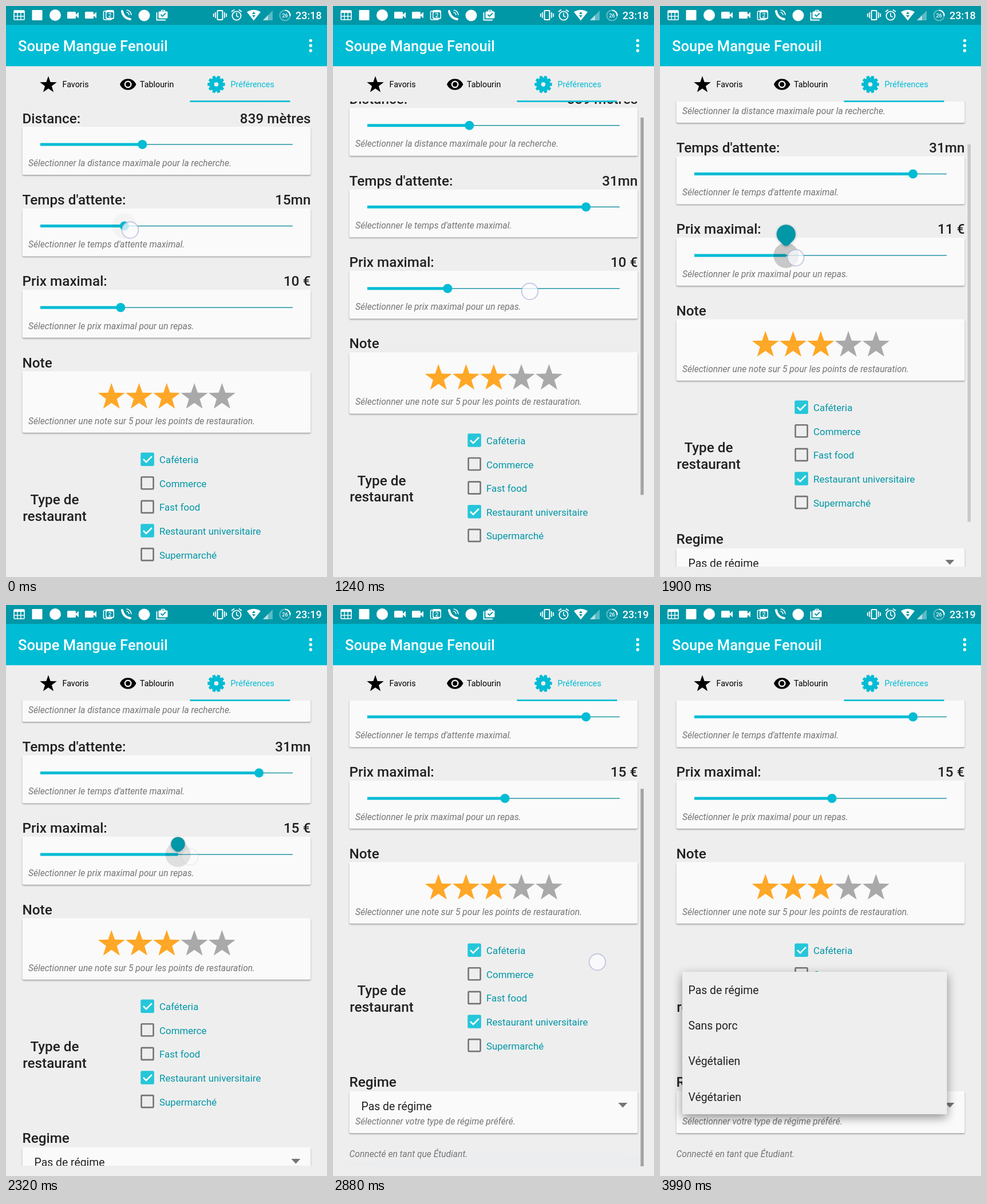
Recreate the animation shown at these times as an HTML page with a canvas. Size 561 by 998 pixels, loop 4050 ms.

```html
<!DOCTYPE html>
<html lang="fr">
<head>
<meta charset="utf-8">
<title>Préférences</title>
<style>
html, body { margin: 0; width: 100%; height: 100%; overflow: hidden; background: #eee; }
canvas { display: block; }
</style>
</head>
<body>
<canvas id="stage" width="561" height="998"></canvas>
<script>
const ctx = document.getElementById('stage').getContext('2d');
const LOOP = 4050, TOP = 167, BOTTOM = 980, CONTENT = 1002;
const CYAN = '#00bcd4', TEAL = '#0097a7', INK = '#212121', GREY = '#757575';
const FAMILY = 'Roboto, "Open Sans", sans-serif';

// Piecewise linear value at time t through [time, value] points
function track(t, points) {
  if (t <= points[0][0]) return points[0][1];
  for (let i = 1; i < points.length; i++) {
    const [t0, v0] = points[i - 1], [t1, v1] = points[i];
    if (t < t1) return v0 + (v1 - v0) * (t - t0) / (t1 - t0);
  }
  return points[points.length - 1][1];
}

function text(str, x, y, size, color, style = '', align = 'left') {
  ctx.font = `${style} ${size}px ${FAMILY}`;
  ctx.fillStyle = color;
  ctx.textAlign = align;
  ctx.fillText(str, x, y);
}
const heading = (str, y, x = 28.5, align = 'left') => text(str, x, y, 24.3, INK, '500', align);
const hint = (str, y, x = 39) => text(str, x, y, 15.6, GREY, 'italic');

function rect(x, y, w, h, color, r = 0) {
  ctx.fillStyle = color;
  ctx.beginPath();
  ctx.roundRect(x, y, w, h, r);
  ctx.fill();
}

function disc(x, y, r, color) {
  ctx.fillStyle = color;
  ctx.beginPath();
  ctx.arc(x, y, r, 0, 7);
  ctx.fill();
}

function ring(x, y, r, color, width, from = 0, to = 7) {
  ctx.strokeStyle = color;
  ctx.lineWidth = width;
  ctx.beginPath();
  ctx.arc(x, y, r, from, to);
  ctx.stroke();
}

function path(points, color, width) {
  ctx.beginPath();
  points.forEach(([x, y]) => ctx.lineTo(x, y));
  if (width) {
    ctx.strokeStyle = color;
    ctx.lineWidth = width;
    ctx.stroke();
  } else {
    ctx.fillStyle = color;
    ctx.fill();
  }
}

function box(x, y, w, h, color, width, r = 1) {
  ctx.strokeStyle = color;
  ctx.lineWidth = width;
  ctx.beginPath();
  ctx.roundRect(x, y, w, h, r);
  ctx.stroke();
}

function star(x, y, r, color) {
  const points = [];
  for (let i = 0; i < 10; i++) {
    const a = i * Math.PI / 5, d = i % 2 ? r * 0.4 : r;
    points.push([x + d * Math.sin(a), y - d * Math.cos(a)]);
  }
  path(points, color);
}

function raised(x, y, w, h, color, shade, blur, drop) {
  ctx.save();
  ctx.shadowColor = `rgba(0,0,0,${shade})`;
  ctx.shadowBlur = blur;
  ctx.shadowOffsetY = drop;
  rect(x, y, w, h, color, 2.5);
  ctx.restore();
}
const card = (y, h) => raised(28.5, y, 504, h, '#fafafa', 0.32, 2.5, 1.7);

function statusBar(clock) {
  const W = '#fff';
  rect(0, 0, 561, 33, TEAL);
  box(14, 8, 18, 16, W, 1.6);
  rect(14, 8, 18, 4, W);
  path([[14, 18], [32, 18]], W, 1.4);
  path([[20, 11], [20, 24]], W, 1.4);
  path([[26, 11], [26, 24]], W, 1.4);
  rect(45.5, 7, 18, 18, W, 1);
  disc(86, 16, 10, W);
  for (const x of [107, 138]) {
    rect(x, 10, 15, 12, W, 1.5);
    path([[x + 14, 16], [x + 20, 10.5], [x + 20, 21.5]], W);
  }
  box(170.5, 9, 14, 15, W, 1.6, 2);
  rect(174, 7, 15, 16, W, 3);
  rect(175.5, 11, 12, 10, TEAL, 2);
  text('2', 181.5, 20, 10, W, '500', 'center');
  // handset with sound waves
  ctx.lineCap = 'round';
  ctx.strokeStyle = W;
  ctx.lineWidth = 4;
  ctx.beginPath();
  ctx.moveTo(203, 9);
  ctx.quadraticCurveTo(205, 21, 217, 23);
  ctx.stroke();
  ctx.lineCap = 'butt';
  ring(210, 16, 5, W, 1.6, -1.5, 0);
  ring(210, 16, 9, W, 1.6, -1.5, 0);
  disc(241.5, 16.5, 10, W);
  path([[263.5, 11], [263.5, 24.5], [279, 24.5]], W, 1.8);
  rect(266.5, 9.5, 16, 12, W, 1.5);
  box(271.5, 7.5, 6, 3, W, 1.6);
  path([[270.5, 15], [273.5, 18], [279, 12.5]], TEAL, 1.8);

  box(369.5, 8, 9, 16, W, 2);
  for (const s of [-1, 1]) {
    path([[374 + s * 8, 11], [374 + s * 8, 21]], W, 1.8);
    path([[374 + s * 11.2, 13], [374 + s * 11.2, 19]], W, 1.8);
    path([[403 + s * 9, 10], [403 + s * 4, 6.5]], W, 2);
  }
  ring(403, 17, 7.6, W, 1.9);
  path([[403, 12], [403, 17.5], [406.5, 19.5]], W, 1.6);
  ctx.fillStyle = W;
  ctx.beginPath();
  ctx.moveTo(433, 25.5);
  ctx.lineTo(421, 10.5);
  ctx.quadraticCurveTo(433, 3, 445, 10.5);
  ctx.fill();
  path([[433, 10], [436, 14], [430, 14]], TEAL);
  path([[433, 20], [436, 16], [430, 16]], TEAL);
  path([[449, 25], [466, 25], [466, 8]], 'rgba(255,255,255,.35)');
  path([[449, 25], [458, 25], [458, 16]], 'rgba(255,255,255,.55)');
  ring(487.5, 16.5, 9, 'rgba(255,255,255,.35)', 2.2);
  ring(487.5, 16.5, 9, W, 2.2, -1.57, 0.1);
  text('26', 487.5, 20, 9, W, '500', 'center');
  text(clock, 506, 23, 18, W, '500');
}

function header() {
  rect(0, 33, 561, 72.5, CYAN);
  text('Soupe Mangue Fenouil', 21, 79, 25.6, '#fff', '500');
  for (const y of [60.5, 69.2, 78]) disc(532.5, y, 2.7, '#fff');

  rect(0, 105.5, 561, TOP - 105.5, '#eee');
  star(74, 138, 15.5, '#000');
  text('Favoris', 98.5, 142, 14.3, '#000');
  ctx.fillStyle = '#000';
  ctx.beginPath();
  ctx.moveTo(199, 137);
  ctx.bezierCurveTo(204, 124, 222, 124, 227.5, 137);
  ctx.bezierCurveTo(222, 150, 204, 150, 199, 137);
  ctx.fill();
  disc(213.2, 137, 6.5, '#eee');
  disc(213.2, 137, 4, '#000');
  text('Tablourin', 234, 142, 14.3, '#000');
  disc(367.5, 137, 12.3, CYAN);
  for (let i = 0; i < 10; i++) {
    ctx.save();
    ctx.translate(367.5, 137);
    ctx.rotate((i + 0.5) * Math.PI / 5);
    rect(-2.7, -15.2, 5.4, 6, CYAN, 1);
    ctx.restore();
  }
  disc(367.5, 137, 3.8, '#eee');
  text('Préférences', 392.5, 142, 14.3, CYAN);
  rect(321.5, 165.3, 175, 2.7, CYAN);
}

const thumbX = (v, min, max) => 60 + 441 * (v - min) / (max - min);

// open: 0 = resting thumb, 1 = raised marker showing the value
function slider(y, x, label = '', open = 0, halo = 0) {
  rect(60, y - 0.7, 441, 1.4, '#2096a4');
  rect(60, y - 2.6, x - 60, 5.2, CYAN);
  if (!open) disc(x, y, 8, CYAN);
  if (halo) disc(x, y, 22, `rgba(0,0,0,${halo})`);
  if (!open) return;
  const r = 8 + 14.5 * open;
  ctx.save();
  ctx.translate(x, y - 62.5 * open);
  ctx.rotate(Math.PI / 4);
  ctx.shadowColor = 'rgba(0,0,0,.25)';
  ctx.shadowBlur = 4;
  ctx.shadowOffsetY = 1;
  rect(-r, -r, 2 * r, 2 * r, TEAL, [r, r, r * (1 - open), r]);
  ctx.restore();
  if (open > 0.9) text(label, x, y - 56.5, 17, '#fff', '', 'center');
}

function option(label, y, checked) {
  if (checked) {
    rect(235.3, y - 11.8, 23.6, 23.6, '#26c6da', 2.5);
    path([[240, y], [245, y + 5], [255, y - 5]], '#fff', 2.6);
  } else {
    box(236.6, y - 10.5, 21, 21, GREY, 2.6);
  }
  text(label, 268, y + 7, 16.9, TEAL);
}

function pointer(x, y, alpha) {
  if (alpha <= 0) return;
  ctx.globalAlpha = alpha;
  disc(x, y, 14.5, 'rgba(252,252,255,.75)');
  ring(x, y, 14.3, 'rgba(165,172,212,.6)', 2);
  ctx.globalAlpha = 1;
}

function form(t, scroll) {
  const drag = waitAt(t), wait = Math.round(drag);
  const price = Math.round(priceAt(t));
  ctx.save();
  ctx.beginPath();
  ctx.rect(0, TOP, 561, BOTTOM - TOP);
  ctx.clip();
  ctx.translate(0, -scroll);

  const values = ['839 mètres', wait + 'mn', price + ' €'];
  ['Distance:', "Temps d'attente:", 'Prix maximal:', 'Note'].forEach((name, i) => {
    const y = 204.5 + 142.4 * i;
    heading(name, y);
    if (values[i]) heading(values[i], y, 532.5, 'right');
    card(y + 6.5, i < 3 ? 84 : 107.5);
  });
  hint('Sélectionner la distance maximale pour la recherche.', 279.7);
  hint("Sélectionner le temps d'attente maximal.", 422.2);
  hint('Sélectionner le prix maximal pour un repas.', 564.6);
  hint('Sélectionner une note sur 5 pour les points de restauration.', 730.5);
  for (let i = 0; i < 5; i++) star(184.3 + 48.3 * i, 683.8, 24.7, i < 3 ? '#ffa726' : '#a9a9a9');

  heading('Type de', 871, 85, 'center');
  heading('restaurant', 899.5, 85, 'center');
  ['Caféteria', 'Commerce', 'Fast food', 'Restaurant universitaire', 'Supermarché']
    .forEach((label, i) => option(label, 792.2 + 41.6 * i, i % 3 === 0));

  heading('Regime', 1031);
  card(1038.5, 73.5);
  text('Pas de régime', 49.5, 1071.5, 19.4, INK);
  path([[498.5, 1059], [514.5, 1059], [506.5, 1067.5]], GREY);
  hint('Sélectionner votre type de régime préféré.', 1096.5);
  hint('Connecté en tant que Étudiant.', 1154, 28.5);

  slider(242, 238.3);
  slider(384.5, thumbX(wait, 5, 35), wait,
    track(t, [[40, 0], [230, 1], [860, 1], [1040, 0]]),
    track(t, [[0, 0.025], [130, 0.2], [860, 0.2], [1050, 0]]));
  slider(527, thumbX(price, 3, 25), price,
    track(t, [[1800, 0], [1970, 1], [2220, 1], [2363, 0]]),
    track(t, [[1780, 0], [1900, 0.2], [2240, 0.2], [2420, 0]]));
  ctx.restore();
}

const waitAt = t => track(t, [[60, 15], [540, 28], [650, 29.5], [770, 30.7]]);
const priceAt = t => track(t, [[1820, 10], [2200, 15.35]]);
const scrollAt = t => track(t, [[1130, 0], [1200, 18], [1340, 70], [1410, 85], [1500, 91],
  [2460, 91], [2710, 148], [2860, 189]]);

function scrollBar(t, scroll) {
  const alpha = t < 2300
    ? track(t, [[1110, 0], [1150, 1], [1780, 1], [2030, 0]])
    : track(t, [[2440, 0], [2470, 1], [3450, 1], [3700, 0]]);
  const ratio = (BOTTOM - TOP) / CONTENT;
  rect(537.5, TOP + 1 + scroll * ratio, 5.5, (BOTTOM - TOP) * ratio, `rgba(0,0,0,${0.31 * alpha})`);
}

function edgeGlow(t) {
  const size = track(t, [[2860, 0], [3100, 1], [3200, 1], [3540, 0]]);
  if (!size) return;
  ctx.save();
  ctx.beginPath();
  ctx.rect(18, TOP, 525, BOTTOM - TOP);
  ctx.clip();
  ctx.fillStyle = `rgba(0,150,212,${0.13 * size})`;
  ctx.beginPath();
  ctx.ellipse(370, BOTTOM + 30, 440, 30 + 70 * size * size * 0.5 + 22, 0, 0, 7);
  ctx.fill();
  ctx.restore();
}

function popup(t) {
  const alpha = track(t, [[3870, 0], [3985, 1]]);
  if (!alpha) return;
  ctx.globalAlpha = alpha;
  raised(39, 641, 462.5, 249, '#eee', 0.42, 17, 6);
  ['Pas de régime', 'Sans porc', 'Végétalien', 'Végétarien']
    .forEach((label, i) => text(label, 49.5, 679.8 + 62.3 * i, 19.4, INK));
  ctx.globalAlpha = 1;
}

function touches(t) {
  pointer(thumbX(waitAt(t), 5, 35) + 10, 391.5, track(t, [[830, 1], [930, 0]]));
  pointer(344, track(t, [[1130, 540], [1340, 462], [1410, 445], [1500, 438]]),
    track(t, [[1090, 0], [1130, 1], [1420, 1], [1530, 0]]));
  pointer(thumbX(priceAt(t), 3, 25) + 14, 440,
    track(t, [[1740, 0], [1780, 1], [2220, 1], [2350, 0]]));
  pointer(462, track(t, [[2440, 740], [2710, 670], [2860, 629], [3150, 560]]),
    track(t, [[2420, 0], [2460, 1], [3160, 1], [3270, 0]]));
  pointer(330, 880, track(t, [[3690, 0], [3730, 1], [3790, 1], [3870, 0]]));
}

function draw() {
  const t = performance.now() % LOOP, scroll = scrollAt(t);
  rect(0, 0, 561, 998, '#eee');
  form(t, scroll);
  edgeGlow(t);
  scrollBar(t, scroll);
  header();
  statusBar(t < 2290 ? '23:18' : '23:19');
  popup(t);
  touches(t);
  requestAnimationFrame(draw);
}
draw();
</script>
</body>
</html>
```
